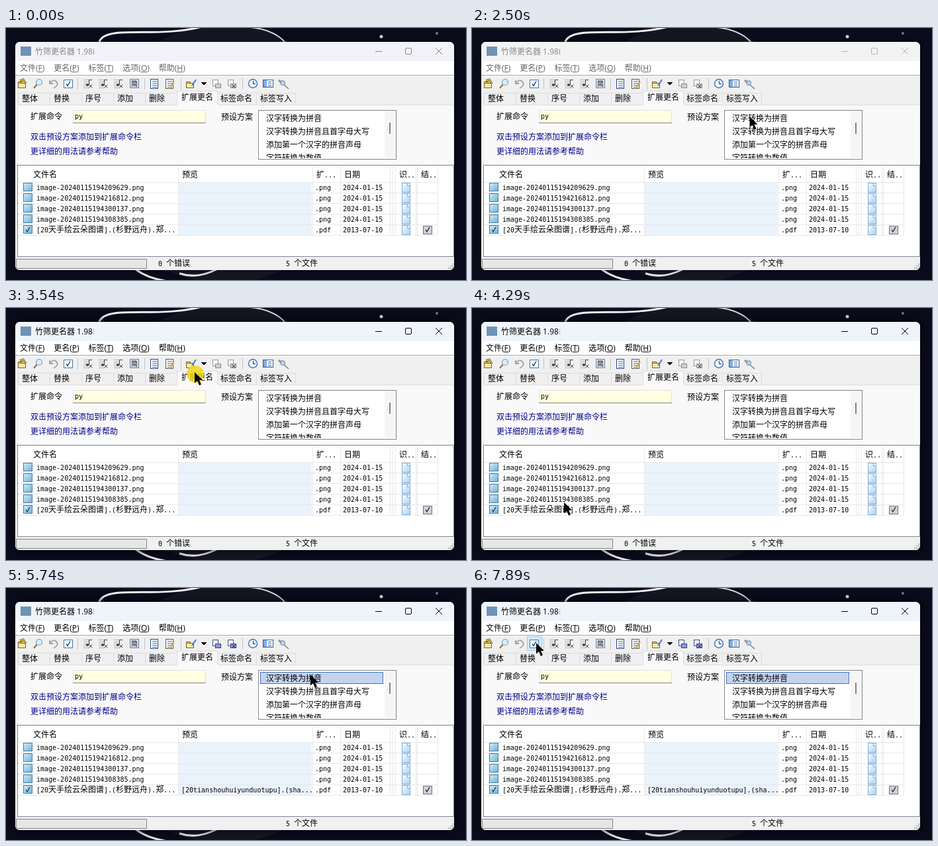
Animation of 695 by 381 pixels, one loop 8000 ms. Source, as an HTML page with a canvas:

```html
<!DOCTYPE html>
<html lang="zh-CN">
<head>
<meta charset="utf-8">
<style>
html, body { margin: 0; width: 100%; height: 100%; overflow: hidden; background: #0a0b1b; }
canvas { display: block; }
</style>
</head>
<body>
<canvas id="stage" width="695" height="381"></canvas>
<script>
const c = document.getElementById('stage').getContext('2d');
const LOOP = 8000, STEP = 70, PHASE = 40;
const CJK = '"Noto Sans CJK SC", "Noto Sans CJK", sans-serif';
const SONG = '12px ' + CJK;
const MONO = '10px "DejaVu Sans Mono", monospace';
const UI = '12px "Open Sans", ' + CJK;

// Pointer hops: start, duration, end point
const HOPS = [
  [460, 350, 412, 126], [810, 70, 419, 134], [880, 280, 438, 134],
  [2440, 350, 104, 130], [2800, 250, 285, 97],
  [3950, 340, 130, 306], [4430, 340, 457, 138], [4800, 140, 460, 131],
  [6130, 450, 253, 301], [6620, 280, 211, 90],
  [7000, 420, 115, 86], [7570, 250, 97, 83]
];

const ease = u => u * u * (3 - 2 * u);

function pointer(t) {
  const now = Math.floor((t - PHASE) / STEP) * STEP + PHASE;
  let x = 527, y = 251;
  for (const [start, time, tx, ty] of HOPS) {
    const k = ease(Math.min(1, Math.max(0, (now - start) / time)));
    x += (tx - x) * k;
    y += (ty - y) * k;
  }
  return [x, y];
}

function fill(x, y, w, h, color) {
  c.fillStyle = color;
  c.fillRect(x, y, w, h);
}

function box(x, y, w, h, bg, edge) {
  fill(x, y, w, h, bg);
  c.strokeStyle = edge;
  c.lineWidth = 1;
  c.strokeRect(x + .5, y + .5, w - 1, h - 1);
}

const across = (x, y, w, color) => fill(x, y, w, 1, color);
const down = (x, y, h, color) => fill(x, y, 1, h, color);

function line(color, width, ...p) {
  c.strokeStyle = color;
  c.lineWidth = width;
  c.beginPath();
  for (let i = 0; i < p.length; i += 2) c.lineTo(p[i], p[i + 1]);
  c.stroke();
}

function cross(x, y, r, color, width = 1) {
  line(color, width, x - r, y - r, x + r, y + r);
  line(color, width, x - r, y + r, x + r, y - r);
}

function disc(x, y, r, color, edge, width = 1.4) {
  c.beginPath();
  c.arc(x, y, r, 0, 7);
  c.fillStyle = color;
  c.fill();
  if (!edge) return;
  c.strokeStyle = edge;
  c.lineWidth = width;
  c.stroke();
}

function curve(path, color, width) {
  c.strokeStyle = color;
  c.lineWidth = width;
  c.stroke(new Path2D(path));
}

function tint(x, y, size, from, to) {
  const g = c.createLinearGradient(x, y, x + size, y + size);
  g.addColorStop(0, from);
  g.addColorStop(1, to);
  return g;
}

// Full-width glyphs at 12px, half-width ones at 6px advance; y is the middle
function text(s, x, y, color = '#000') {
  c.fillStyle = color;
  for (const run of s.match(/[\x20-\x7e]+|[^\x20-\x7e]+/g)) {
    c.font = run.charCodeAt(0) < 127 ? MONO : SONG;
    c.fillText(run, x, y + 4);
    x += c.measureText(run).width;
  }
}

function label(s, x, y, color) {
  c.font = UI;
  c.fillStyle = color;
  c.fillText(s, x, y + 4.5);
  return c.measureText(s).width;
}

function wallpaper() {
  fill(0, 0, 695, 381, '#0a0b1b');
  disc(330, 190, 196, '#141622');
  curve('M141 21C150 -6 230 17 300 -3', '#eeeef2', 3);
  curve('M370 -1Q405 3 421 21', '#d5d5dd', 2);
  curve('M196 365Q215 379 245 383M262 371Q288 380 318 365', '#e4e4ea', 3);
  disc(567, 13, 2.5, '#d6d6de');
  disc(651, 8, 2, '#73758a');
}

function titleBar(t, active) {
  const lit = active || t < 165;
  fill(14, 21, 663, 29, active ? '#eff4fa' : lit ? '#f3f2f9' : '#f3f3f3');
  fill(22, 28, 16, 14, '#6f93b5');
  const ink = active ? '#000' : '#888';
  const w = label('竹筛更名器 1.98', 44, 35, ink);
  label('i', 44 + w, 35, active ? '#b4b8be' : ink);
  const button = active ? '#000' : lit ? '#888' : '#b4b4b4';
  across(558, 35, 10, button);
  c.strokeStyle = button;
  c.lineWidth = 1;
  c.beginPath();
  c.roundRect(603.5, 30.5, 9, 9, 1.5);
  c.stroke();
  cross(654, 35, 5, button);
}

function menu(active) {
  fill(14, 50, 663, 21, '#fff');
  const ink = active ? '#000' : '#666';
  let x = 21;
  for (const item of ['文件F', '更名P', '标签T', '选项O', '帮助H']) {
    const name = item.slice(0, 2), key = item[2];
    const w = label(`${name}(${key})`, x, 60, ink);
    across(x + c.measureText(name + '(').width, 66, c.measureText(key).width, ink);
    x += w + 14;
  }
}

function tick(x, y, color) {
  line(color, 1.3, x - 3, y, x - 1, y + 3, x + 3, y - 4);
}

function pen(x, y, color) {
  line(color, 2, x + 6, y - 6, x, y + 3);
}

function page(x, ink) {
  box(x - 6, 77, 12, 15, '#fff', ink);
  for (let y = 80; y < 90; y += 3) across(x - 3, y, 7, '#3a6ab0');
}

function folder(x) {
  box(x - 7, 81, 7, 4, '#f3dc8c', '#75622c');
  box(x - 7, 83, 12, 8, '#f8e9a8', '#75622c');
}

function note(x) {
  for (let y = 78; y < 91; y += 3) across(x - 7, y, 9, '#b0b0b0');
  down(x + 1, 78, 8, '#444');
  across(x + 1, 78, 5, '#444');
  disc(x - 1, 86, 2, '#444');
  cross(x + 4, 88, 2.5, '#444');
}

function disk(x, ready) {
  box(x - 6, 78, 9, 10, '#fafafa', ready ? '#444a80' : '#999');
  box(x - 2, 84, 9, 7, ready ? '#9298dd' : '#d0d0d0', ready ? '#34397c' : '#8c8c8c');
}

function toolbar(ready, hover) {
  fill(14, 71, 663, 25, '#f0f0f0');
  across(14, 71, 663, '#a0a0a0');
  across(14, 72, 663, '#fff');
  for (const x of [108, 209, 264, 357]) down(x, 76, 17, '#c2c2c2');

  folder(25);
  line('#3a3000', 3, 21, 80, 26, 78, 30, 84);
  line('#f2cf3a', 1.5, 21, 80, 26, 78, 30, 84);

  line('#9a7338', 2, 47, 85, 42, 91);
  disc(50, 82, 4.5, '#d8edfb', '#7d9fbe', 1.2);

  curve('M66 79V84H71M66 84Q71 76 76 81T72 91', '#a0a0a0', 1.8);

  if (hover) box(83, 73, 23, 22, '#d3e8fa', '#9acbf2');
  box(87, 78, 14, 13, '#fff', '#3f78a8');
  tick(94, 84.5, '#1c2f4a');

  for (let i = 0; i < 3; i++) note(124 + i * 23);
  box(187, 77, 14, 14, '#dde3ee', '#6d7fa7');
  c.font = '10px ' + CJK;
  c.fillStyle = '#111';
  c.fillText('简', 189, 88);

  page(224, '#26468c');
  page(247, '#555');
  pen(248, 87, '#d0a33a');
  folder(279);
  pen(281, 84, '#4b74bd');
  for (let i = 0; i < 4; i++) across(295 + i, 82 + i, 8 - i * 2, '#000');
  disk(318, ready);
  disk(341, ready);
  cross(344, 88, 2.5, '#20264c');

  disc(373, 84, 6.5, '#f0f7ff', '#3c74b8');
  down(373, 80, 5, '#1d3558');
  across(373, 84, 4, '#1d3558');
  box(388, 78, 16, 12, '#fff', '#2a5aa2');
  fill(389, 79, 5, 10, '#7eade2');
  for (let y = 81; y < 89; y += 3) across(396, y, 5, '#2a5aa2');
  line('#70808e', 1.4, 419, 85, 427, 92);
  disc(418, 83, 3.5, '#c3d3e2', '#7188a0', 1);
  line('#8196ac', 3, 412, 79, 416, 82);
}

function tabs() {
  fill(14, 96, 663, 21, '#f0f0f0');
  fill(18, 116, 658, 90, '#f9f9f9');
  across(18, 98, 419, '#dcdcdc');
  across(18, 116, 658, '#dcdcdc');
  ['整体', '替换', '序号', '添加', '删除'].forEach((s, i) => {
    down(18 + i * 48, 98, 18, '#dcdcdc');
    text(s, 24 + i * 48, 107);
  });
  ['标签命名', '标签写入'].forEach((s, i) => {
    text(s, 324 + i * 60, 107);
    down(378 + i * 59, 98, 18, '#dcdcdc');
  });
  box(258, 95, 62, 23, '#f9f9f9', '#dcdcdc');
  fill(258, 116, 62, 3, '#f9f9f9');
  text('扩展更名', 265, 105);
}

function panel(selected) {
  text('扩展命令', 37, 134);
  box(101, 124, 201, 20, '#ffffe1', '#e3e3e3');
  across(101, 143, 201, '#858585');
  text('py', 104, 133);
  text('双击预设方案添加到扩展命令栏', 37, 165, '#00008b');
  text('更详细的用法请参考帮助', 37, 187, '#00008b');
  text('预设方案', 325, 135);

  box(381, 124, 209, 75, '#fff', '#828790');
  c.save();
  c.beginPath();
  c.rect(382, 125, 207, 72);
  c.clip();
  fill(572, 125, 17, 73, '#f5f5f5');
  fill(579, 143, 2, 17, '#858585');
  if (selected) box(384, 127, 186, 18, '#c5d4ee', '#3f73b8');
  ['汉字转换为拼音', '汉字转换为拼音且首字母大写', '添加第一个汉字的拼音声母', '字符转换为数值']
    .forEach((s, i) => text(s, 393, 137 + i * 20));
  c.restore();
}

function sheet(x, y) {
  box(x, y, 13, 15, tint(x, y, 13, '#fff', '#a9d2f5'), '#7fabd8');
  box(x + 8, y, 5, 5, '#fff', '#7fabd8');
}

function table(ready) {
  box(17, 207, 660, 139, '#fff', '#828790');
  fill(261, 234, 201, 79, '#eaf2fc');
  const cols = { '文件名': 41, '预览': 266, '扩...': 469, '日期': 511, '识..': 594, '结..': 627 };
  for (const s in cols) {
    text(s, cols[s], 222);
    down(cols[s] - 6, 209, s === '文件名' ? 0 : 104, '#e8e8e8');
  }
  for (const x of [41, 580, 584, 619, 652]) down(x, 209, 104, '#e8e8e8');
  for (let i = 0; i < 6; i++) across(18, 233 + i * 16, 634, '#e8e8e8');

  ['4209629', '4216812', '4300137', '4308385', ''].forEach((stamp, i) => {
    const y = 241 + i * 16;
    box(26, y - 7, 14, 13, tint(26, y - 7, 13, '#d5f0fb', '#6fb0d8'), '#4c7c9e');
    text(stamp ? `image-2024011519${stamp}.png` : '[20天手绘云朵图谱].(杉野远舟).郑...', 46, y);
    text(stamp ? '.png' : '.pdf', 467, y);
    text(stamp ? '2024-01-15' : '2013-07-10', 509, y);
    sheet(598, y - 7);
  });
  tick(33, 305, '#16395a');
  box(630, 299, 14, 13, '#d0d1da', '#70727e');
  tick(637, 305, '#22242e');
  if (ready) text('[20tianshouhuiyunduotupu].(sha...', 265, 305);
}

function status(ready) {
  fill(14, 346, 663, 20, '#f0f0f0');
  box(15, 349, 198, 15, '#e6e6e6', '#858585');
  if (!ready) text('0 个错误', 230, 356);
  text('5 个文件', 423, 356);
  for (let i = 0; i < 3; i++)
    for (let j = 0; j <= i; j++) fill(674 - j * 3, 356 + i * 3, 2, 2, '#b4b4b4');
}

function cursor(t) {
  if (t < 460) return;
  const [x, y] = pointer(t);
  const pressed = t >= 3470 && t < 3680 || t >= 5130 && t < 5200;
  if (pressed) disc(x + 1, y + 3, 13, 'rgba(240,216,20,.85)');
  c.save();
  c.translate(x, y);
  c.fillStyle = '#000';
  c.fill(new Path2D('M0 0V16.5L4 13L7 20L10 18.5L7 12H12Z'));
  c.restore();
}

function draw(now) {
  const t = now % LOOP;
  const active = t >= 3470, selected = t >= 5130, ready = t >= 5670, hover = t >= 7680;
  wallpaper();
  c.save();
  c.shadowColor = active ? 'rgba(0,0,0,.7)' : 'rgba(0,0,0,.4)';
  c.shadowBlur = active ? 14 : 8;
  c.fillStyle = '#f0f0f0';
  c.beginPath();
  c.roundRect(14, 21, 663, 345, 7);
  c.fill();
  c.shadowColor = 'transparent';
  c.clip();
  titleBar(t, active);
  menu(active);
  toolbar(ready, hover);
  tabs();
  panel(selected);
  table(ready);
  status(ready);
  c.restore();
  cursor(t);
  requestAnimationFrame(draw);
}
requestAnimationFrame(draw);
</script>
</body>
</html>
```
